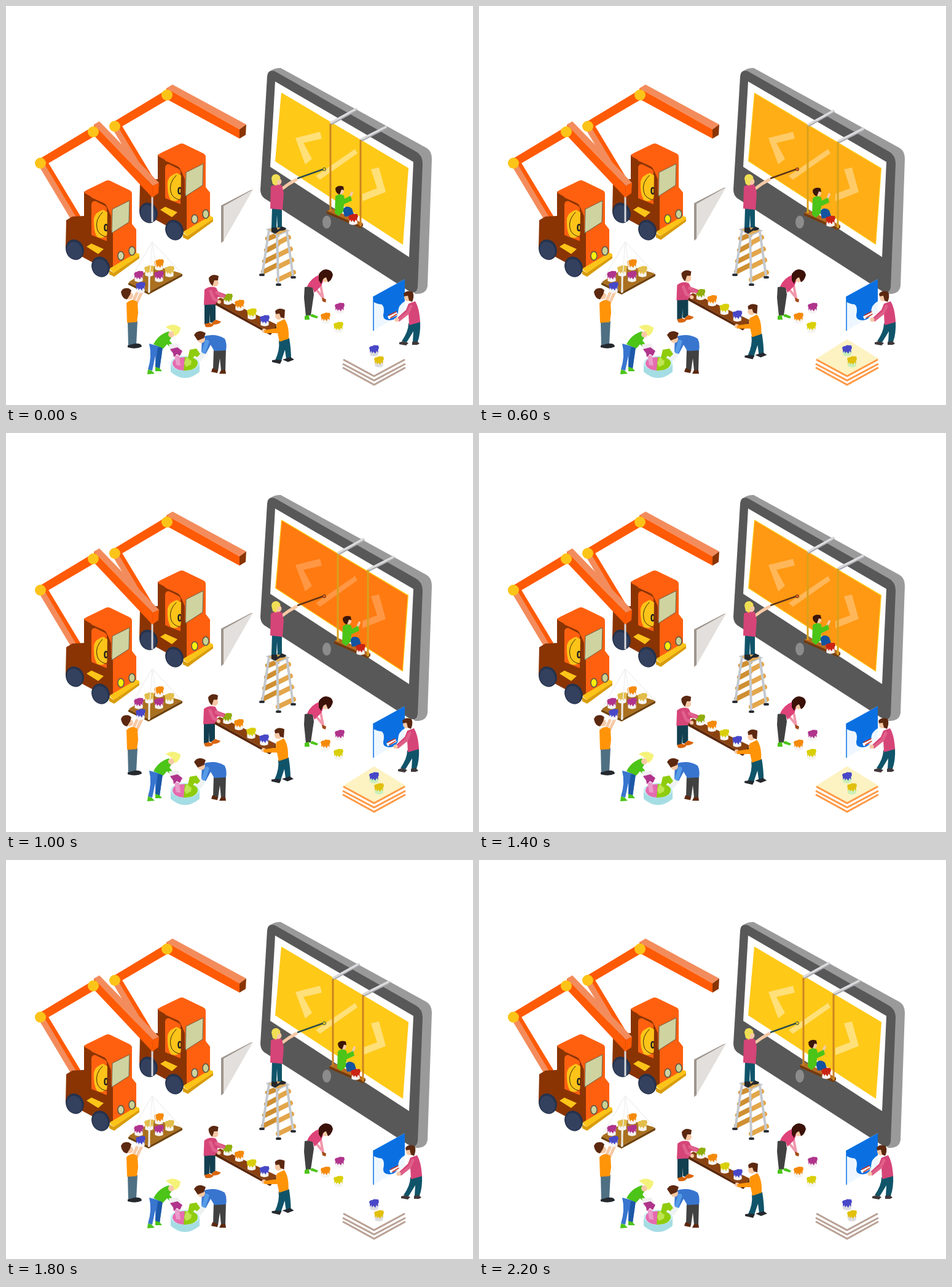
An HTML page for the animation above (2.4 s loop, 760x650 px).

```html
<!DOCTYPE html>
<html lang="en">
<head>
<meta charset="utf-8">
<title>Painting the website</title>
<style>
  html, body { margin: 0; width: 100%; height: 100%; overflow: hidden; background: #fff; }
  svg { display: block; width: 760px; height: 650px;
    --lamp: #cfd3a0; --rope: #cb8420; --pole: #2c4c4c; --tip: #ffc918; --edge: #b9a195; --tin: #dcdce0; }
  svg.lit { --lamp: #ffef0c; --rope: #d8a11c; --pole: #5e3418; --tip: #e8601c; --edge: #ff9844; --tin: #c9f0b8; }
  #paper { visibility: hidden; }
  .lit #paper { visibility: visible; }
  .orange { fill: #ff5a05; } .salmon { fill: #f38c5c; } .dark { fill: #8a3404; } .cab { fill: #ff6010; }
  .gold { fill: #fcc419; } .skin { fill: #f6c9a6; } .hair { fill: #5c2810; }
  .rose { fill: #d64578; } .teal { fill: #10546a; } .black { fill: #25292e; }
  .green { fill: #4cc418; } .blue { fill: #3875cf; } .amber { fill: #ff9408; }
  .line { fill: none; stroke-linecap: round; stroke-linejoin: round; }
</style>
</head>
<body>
<svg id="scene" viewBox="0 0 760 650">
  <defs>
    <g id="can">
      <path d="M-7-2 7-3 6.500 9Q0 12.500-6.500 9Z" fill="var(--body, #f5f4f3)"/>
      <path d="M-8-3Q-7-6-3-6L0-7.500 7-7 8-3 6.500 0V5L4 2 2 6.500-1 3-3 6-4.500 2-6.500 5-7 0Z" fill="currentColor"/>
    </g>

    <g id="wheel">
      <ellipse rx="14.500" ry="17" transform="rotate(-22)" fill="#26324c"/>
      <ellipse cx="-1" cy="1" rx="12" ry="14.500" transform="rotate(-22)" fill="#33415f"/>
    </g>

    <g id="truck">
      <path class="salmon" d="M55 263 64 257 117 347 107 350Z"/>
      <path class="orange" d="M63 258 68 254 121 342 116 347Z"/>
      <path class="dark" d="M98 349 108 343 127 342V302L172 322 176 428 160 428 97 394Z"/>
      <path class="cab" d="M127 306Q127 302 131 300L162 285Q166 283 170 285L201 300Q205 302 205 306V355L212 364V411L174 427V369L165 358V332Q165 324 159 321L139 312Z"/>
      <path class="dark" d="M127 304 139 311V384L127 376Z"/>
      <path class="cab" d="M139 323Q140 317 146 318L160 325Q164 327 164 331V383L139 373Z"/>
      <path class="gold" d="M143 346Q145 336 158 332L165 336V372Q157 381 148 376Q142 366 143 346Z"/>
      <path class="line" d="M157 336Q145 348 148 362Q150 373 163 376" stroke="#3b2a05"/>
      <ellipse cx="163" cy="361" rx="2.500" ry="5" fill="#fcc419" stroke="#222" stroke-width="2.500"/>
      <path class="dark" d="M165 328 171 342V366L174 370V428L164 420Z"/>
      <path class="gold" d="M131 392 139 387 159 396 150 404Z"/>
      <path d="M173 331 201 317 200 352 172 370Z" fill="#cfd3a0" stroke="#6d5b43"/>
      <path class="gold" d="M168 428 212 402 217 404V408L175 435Z"/>
      <path d="M168 430 175 435 217 407V411L176 441 168 437Z" fill="#d99c0b"/>
      <ellipse cx="187" cy="407" rx="5" ry="7" fill="var(--lamp)" stroke="#59584a" stroke-width="1.500"/>
      <ellipse cx="205" cy="399" rx="5" ry="7" fill="#c9d194" stroke="#59584a" stroke-width="1.500"/>
      <use href="#wheel" x="112" y="397"/>
      <use href="#wheel" x="154" y="425"/>
      <path class="orange" d="M53 250 139 198 146 211 59 262Z"/>
    </g>
  </defs>

  <!-- cranes -->
  <use href="#truck" x="120" y="-60"/>
  <path class="salmon" d="M261 134 271 128 391 193 380 201Z"/>
  <path class="orange" d="M261 134 380 201V216L262 152Z"/>
  <path class="dark" d="M380 201 391 193 390 210 380 216Z"/>
  <path d="M238 308V352" stroke="#d9d9dc" stroke-width="3"/>
  <path class="salmon" d="M143 193 152 188 249 288 239 293Z"/>
  <path class="orange" d="M143 193 239 293 238 312 145 213Z"/>
  <path class="orange" d="M239 293 249 288 248 305 238 312Z"/>
  <use href="#truck"/>
  <g class="gold">
    <circle cx="56" cy="256" r="9"/><circle cx="142" cy="205" r="9"/>
    <circle cx="177" cy="196" r="9"/><circle cx="262" cy="145" r="9"/>
  </g>

  <!-- hanging pallet and its helper -->
  <path d="M199 450 243 423 287 436 232 466Z" fill="#a9701f"/>
  <path d="M199 450 232 466 287 436V440L232 470 199 454Z" fill="#704208"/>
  <use href="#can" x="249" y="420" color="#f58a0a"/>
  <use href="#can" x="233" y="430" color="#e2bd4a"/>
  <use href="#can" x="266" y="431" color="#e2bd4a"/>
  <use href="#can" x="249" y="439" color="#b0348c"/>
  <use href="#can" x="216" y="439" color="#b0348c"/>
  <path class="line" d="M199 451 238 384 286 436M238 384 232 467M238 384 244 424" stroke="#f1f1f1" stroke-width="1.500"/>
  <path d="M233 440V467" stroke="#eee" stroke-width="3"/>
  <path class="line" d="M205 486 213 468M212 485 222 464" stroke="#f6c9a6" stroke-width="5"/>
  <use href="#can" x="219" y="457" color="#4848c8"/>
  <circle class="skin" cx="201" cy="472" r="6"/>
  <path class="hair" d="M187 466Q190 458 200 460L204 463 202 470 197 478Q189 477 187 466Z"/>
  <path d="M198 513H214L212 552 199 554Z" fill="#4f7083"/>
  <path class="amber" d="M196 484Q205 475 214 482L215 500 213 515 197 516Z"/>
  <path class="black" d="M198 553 209 550Q221 549 221 555Q211 560 198 556Z"/>

  <!-- monitor -->
  <path d="M426 109Q436 100 447 101L684 231Q693 236 693 249L686 456Q684 470 666 469L650 455Z" fill="#9a9a9a"/>
  <path d="M425 115Q426 103 437 106L667 237Q678 243 678 257L670 458Q668 471 655 464L420 313Q414 308 414 299Z" fill="#585858"/>
  <path d="M438 123 663 254 656 409 430 262Z" fill="#fff"/>
  <path d="M448 141 655 264 646 389 438 253Z" fill="#ffc918"/>
  <path id="tint" d="M449 143 653.500 265 645 387 439.500 252.500Z" fill="#ff7a10"/>
  <path id="code" fill="#fff" d="M471 215 511 205 514 216 484 223 498 249 487 258ZM568 233 572 240 511 283 504 277ZM594 266 607 263 618 303 580 318V306L604 297Z"/>
  <ellipse cx="522" cy="352" rx="7" ry="10.500" fill="#8c8c8c"/>

  <!-- swing -->
  <g id="swing">
    <path class="line" d="M530 191 569 169M579 218 618 198" stroke="#a9a9ad" stroke-width="5"/>
    <path class="line" d="M529 190 569 168M578 217 618 197" stroke="#dcdcdf" stroke-width="3.500"/>
    <path d="M522 334 531 330 581 354 577 358Z" fill="#b86b20"/>
    <path d="M522 334 577 358 581 354V358L577 362 522 338Z" fill="#753a0b"/>
    <path d="M548 331Q555 323 563 330L567 342 551 343Z" fill="#1453a0"/>
    <path class="line" d="M549 317 559 313 563 304" stroke="#f6c9a6" stroke-width="4"/>
    <path class="green" d="M536 310Q543 304 550 309L551 314 561 309 563 317 550 323 549 335 541 342 535 337Z"/>
    <circle class="skin" cx="545" cy="302" r="5"/>
    <path d="M536 297Q540 291 549 294L550 300 546 299 543 307Q536 305 536 297Z" fill="#3b1608"/>
    <use href="#can" x="565" y="346" color="#c92313"/>
    <path d="M528 192V334M577 218V359" stroke="var(--rope)" stroke-width="3"/>
  </g>

  <!-- ladder and its painter -->
  <g class="line" stroke-linecap="butt">
    <path d="M426 379 441 373M424 398 441 389M421 416 441 406M419 433 441 422" stroke="#cf8f32" stroke-width="8"/>
    <path d="M443 386 460 377M443 406 463 396M443 425 465 414M443 446 468 434" stroke="#e3a64b" stroke-width="8"/>
    <path d="M428 365 417 437M441 370 443 452M457 367 467 440" stroke="#c3c8ce" stroke-width="4"/>
    <path d="M414 438H419M441 454H446M465 442H470" stroke="#2b2f35" stroke-width="4"/>
  </g>
  <path d="M425 364 442 359 460 366 442 374Z" fill="#e0aa55" stroke="#c3c8ce" stroke-width="2"/>
  <path d="M474 281 516 266" stroke="var(--pole)" stroke-width="2.500"/>
  <circle cx="518" cy="266" r="2.500" fill="var(--tip)" stroke="var(--pole)"/>
  <path class="line" d="M449 298 460 290 472 283" stroke="#f6c9a6" stroke-width="5"/>
  <path class="teal" d="M433 329 449 330V361H442L441 340 440 363 432 361Z"/>
  <path class="black" d="M432 361H441L442 365 449 359 456 362Q456 366 446 366L438 371 432 368Z"/>
  <path class="rose" d="M431 294Q440 288 449 292L452 305 450 332 430 330Z"/>
  <circle class="skin" cx="443" cy="286" r="5.500"/>
  <path d="M432 281Q433 273 441 274Q448 277 446 283L442 283 440 293 434 290Z" fill="#f0df55"/>

  <!-- leaning sheet -->
  <g id="sheet">
    <path d="M354 325 402 299 354 383Z" fill="#e2dfdc"/>
    <path d="M350 325 398 300 402 299 354 326V383L350 386Z" fill="#9f958d"/>
  </g>

  <!-- plank carriers -->
  <g id="carriers">
    <path d="M323 486 341 485V511L335 516 332 515V500L331 518H323Z" fill="#123f50"/>
    <path d="M323 518 331 516 338 519Q337 524 325 523ZM335 516 341 511 350 514Q348 519 336 519Z" fill="#d9650c"/>
    <path d="M339 481 349 475 441 519 430 532Z" fill="#8a4210"/>
    <path d="M339 481 430 532 440 520V526L430 536 339 486Z" fill="#5b2709"/>
    <use href="#can" x="361" y="476" color="#90ad0c"/>
    <use href="#can" x="380" y="486" color="#f58a0a"/>
    <use href="#can" x="400" y="500" color="#d9cf08"/>
    <use href="#can" x="421" y="511" color="#4848c8"/>
    <path class="rose" d="M323 462Q332 455 342 459L345 465 358 470 356 475 345 474 341 486 322 487Z"/>
    <path class="line" d="M333 465 338 477 346 481M343 467 354 473" stroke="#e0628c" stroke-width="5"/>
    <circle class="skin" cx="347" cy="482" r="3"/>
    <circle class="skin" cx="340" cy="451" r="6"/>
    <path class="hair" d="M330 443Q336 435 346 440L345 447 339 447 336 456Q330 451 330 443Z"/>
    <path class="teal" d="M444 545 461 541Q464 560 464 574L456 575 454 560 448 578 438 577Q446 560 444 545Z"/>
    <path class="black" d="M433 577 441 576 449 577 446 583 433 580ZM450 576 463 572 469 576 459 580Z"/>
    <circle class="skin" cx="420" cy="529" r="3.500"/>
    <path class="amber" d="M441 516 453 510Q461 520 460 542L445 547 442 533 421 533 420 528 440 525Z"/>
    <circle class="skin" cx="444" cy="505" r="6"/>
    <path class="hair" d="M438 497Q444 490 454 495L453 509 447 507 445 501 439 502Z"/>
  </g>

  <!-- bending girl and loose cans -->
  <path d="M486 458 499 456 501 470 496 504 488 505 485 475Z" fill="#414141"/>
  <path class="green" d="M486 505 493 503 494 511H486ZM495 503 499 502 508 506 506 509 496 506Z"/>
  <path class="line" d="M511 450 516 476M505 462 515 474" stroke="#f097ab" stroke-width="4"/>
  <path d="M490 457Q496 443 510 438L518 444 513 456 502 467 499 459Z" fill="#de4379"/>
  <circle class="skin" cx="520" cy="445" r="5"/>
  <path d="M509 437Q514 429 521 429Q531 430 532 438Q530 447 524 450L521 442Q515 443 513 453L509 447Z" fill="#3b1108"/>
  <path d="M514 475 521 478 520 483 515 481Z" fill="#a24a18"/>
  <use href="#can" x="543" y="491" color="#b0348c"/>
  <use href="#can" x="520" y="507" color="#f58a0a"/>
  <use href="#can" x="541" y="522" color="#d9cf08"/>

  <!-- paint mixers -->
  <path d="M268 581V596Q291 616 315 596V581Z" fill="#a5dde4"/>
  <ellipse cx="291.500" cy="582" rx="23.500" ry="12" fill="#c4eef1"/>
  <path d="M291 572Q271 572 271 583Q274 594 293 594Z" fill="#e66bb0"/>
  <path d="M291 572Q313 572 312 583Q309 594 289 594Z" fill="#8fcc0c"/>
  <path class="blue" d="M233 550 255 556 250 591 243 588 243 570 238 594 231 592Q238 570 233 550Z"/>
  <path d="M247 556 255 556 250 591 243 588Z" fill="#1c58a7"/>
  <path class="green" d="M231 592 237 594 242 599 230 600ZM243 588 250 590 254 595 243 595Z"/>
  <path class="green" d="M240 551Q248 535 265 530L271 537 266 545 270 550 267 556 262 551 256 558Z"/>
  <circle class="skin" cx="269" cy="535" r="5"/>
  <path d="M260 523Q272 515 284 524Q284 533 275 538L271 530Z" fill="#f5f27a"/>
  <path d="M274 568 282 570 284 586 277 585Z" fill="#ea9cca"/>
  <path d="M265 551 280 550 285 558 268 563Z" fill="#f0eef0"/>
  <path d="M267 559 279 556 287 562 283 570 278 567 273 572 272 566Z" fill="#b0348c"/>
  <path d="M338 559 358 558 357 594H350L348 574 345 595 337 592Z" fill="#414141"/>
  <path class="hair" d="M336 590 345 593 344 598 334 596ZM350 593H357L358 599H347Z"/>
  <path class="blue" d="M319 539Q340 532 356 542Q360 550 358 561L339 562 333 552 325 567 318 563Z"/>
  <path class="line" d="M327 547 322 563" stroke="#559be6" stroke-width="7"/>
  <circle class="skin" cx="318" cy="543" r="6"/>
  <path class="hair" d="M306 536Q313 525 325 533L322 541 312 545Z"/>
  <path d="M293 573 303 572 301 584 293 588 290 582Z" fill="#bfe552"/>
  <path d="M312 561 325 568 317 579 308 575Z" fill="#eef2f2"/>
  <path d="M299 560 310 558 316 567 311 572 307 570 301 578 296 573Z" fill="#8fcc0c"/>

  <!-- blue wall and roller man -->
  <path d="M598 473 649 445V499L598 529Z" fill="#eef7ff"/>
  <path d="M598 473 649 445V481Q638 487 638 499Q637 511 625 512Q613 512 614 503Q617 490 611 486 605 486 598 482Z" fill="#0a70e2"/>
  <path d="M598 473V529" stroke="#0a70e2" stroke-width="1.500"/>
  <g id="roller">
    <path d="M622 508 637 501" stroke="#fff" stroke-width="5"/>
    <path class="line" d="M623 504 635 498M626 508 636 502" stroke="#cc3522" stroke-width="1.500"/>
    <path class="teal" d="M655 517 674 513Q675 533 670 547L662 547 663 530 652 548 644 546Q655 530 655 517Z"/>
    <path d="M640 548 647 546 655 549 651 553 640 551ZM661 547 669 546 673 550 669 552 661 552Z" fill="#40383a"/>
    <path class="rose" d="M655 485 666 481Q673 493 674 515L656 520 655 501 640 514 636 509 651 495Z"/>
    <path class="line" d="M659 489 654 500 640 511" stroke="#df6088" stroke-width="5"/>
    <circle class="skin" cx="636" cy="511" r="3.500"/>
    <circle class="skin" cx="654" cy="475" r="6"/>
    <path class="hair" d="M647 469Q652 462 662 466Q665 473 661 482L656 480 654 472 648 473Z"/>
  </g>

  <!-- paper stack -->
  <path id="paper" d="M548 575 599 543 651 575 599 604Z" fill="#fdf2c2"/>
  <path d="M549 576 599 603 649 576M548 583 599 610 650 583M548 589 599 617 650 589" fill="none" stroke="var(--edge)" stroke-width="3"/>
  <g style="--body: var(--tin)">
    <use href="#can" x="599" y="560" color="#4848c8"/>
    <use href="#can" x="607" y="578" color="#e2c00c"/>
  </g>
</svg>
<script>
  const find = id => document.getElementById(id);
  const scene = find('scene');
  const move = (id, x, y) => find(id).setAttribute('transform', `translate(${x} ${y})`);

  const swingX = [0, 2, 4, 7, 7, 12];
  const rollerX = [0, 2, 3, 4, 3, -2];
  const tint = [0, 0, 0, 0.34, 0.61, 1];

  function draw(now) {
    // Twelve held poses: six forward, then the same six back.
    const step = Math.floor(now % 2400 / 200);
    const pose = Math.min(step, 11 - step);
    move('swing', swingX[pose], swingX[pose] * 0.42);
    move('roller', rollerX[pose], 0);
    move('carriers', -0.2 * pose, -2.5 * pose);
    move('sheet', 0, -1.25 * pose);
    find('tint').setAttribute('opacity', tint[pose]);
    find('code').setAttribute('opacity', 0.42 - 0.2 * tint[pose]);
    scene.classList.toggle('lit', pose > 2);
  }

  const start = performance.now();
  function tick() {
    draw(performance.now() - start);
    requestAnimationFrame(tick);
  }
  tick();
</script>
</body>
</html>
```
